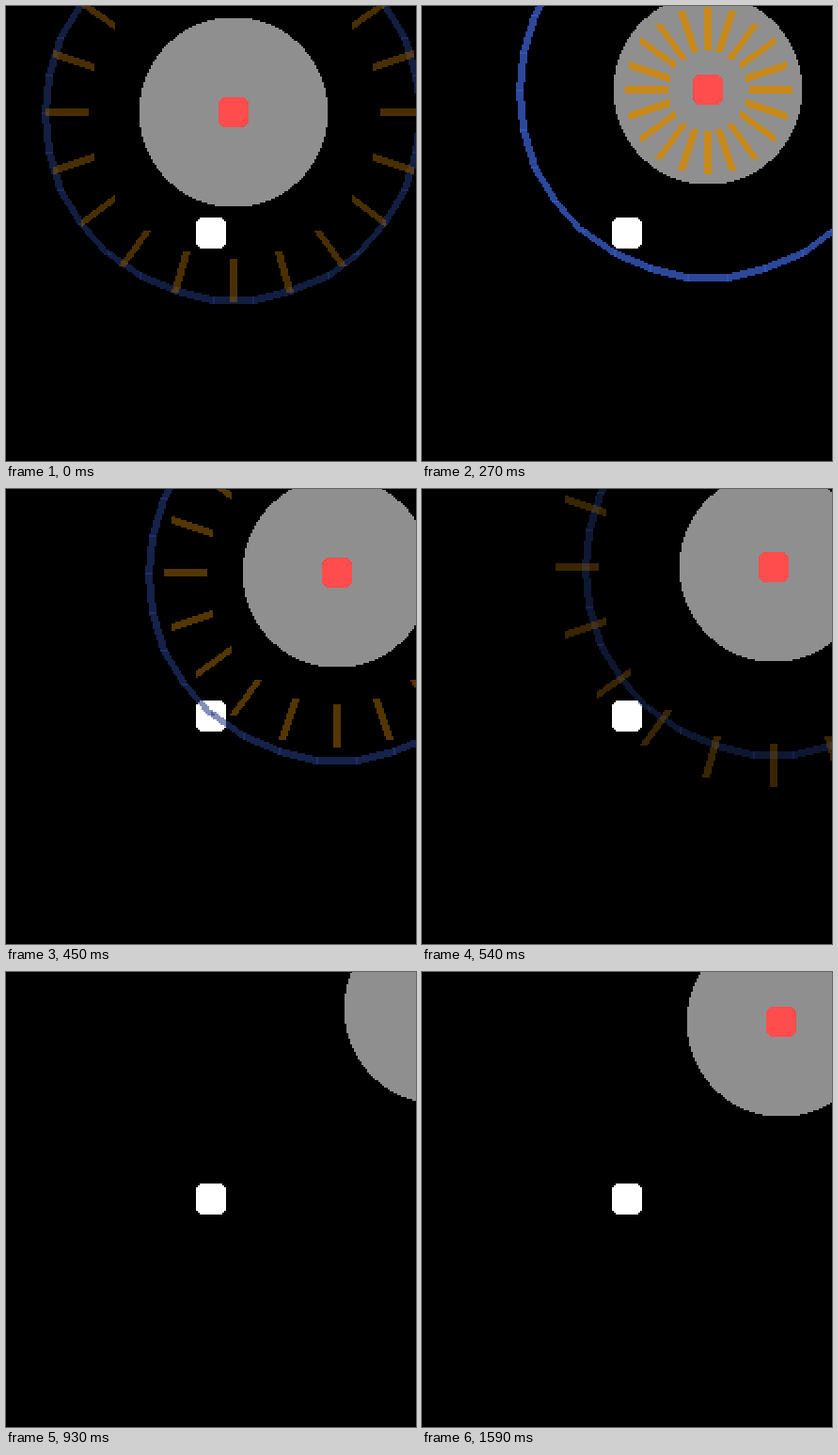
An HTML page with a canvas that plays this animation: 436 px wide and 484 px high, repeating every 1.8 s.

```html
<!DOCTYPE html>
<html lang="en">
<head>
<meta charset="utf-8">
<title>Pulse</title>
<style>
html, body { margin: 0; width: 100%; height: 100%; overflow: hidden; background: #000; }
canvas { display: block; }
</style>
</head>
<body>
<canvas id="stage" width="436" height="484"></canvas>
<script>
const ctx = document.getElementById('stage').getContext('2d');
const LOOP = 1800, TICK = 30, CELL = 2;
const RANGE = 200, SIDES = 30, RAYS = 20, THICK = 8;
const PULSE_STARTS = [-10, 6], PULSE_LIFE = 14;

// Waypoints of the red block: tick, x, y
const PATH = [
  [0, 242, 113], [4, 264.6, 89], [17, 368.6, 89], [23, 402.6, 53],
  [25, 414, 39], [31, 460, 39], [43, 460, 39], [44, 452, 39],
  [48, 420, 39], [50, 406, 53], [53, 382, 53], [60, 382, 53]
];

// The pixel grid starts at even x and odd y
const snapX = x => Math.floor(x / CELL + 1e-6) * CELL;
const snapY = y => Math.floor((y - 1) / CELL + 1e-6) * CELL + 1;

function positionAt(tick) {
  const i = PATH.findIndex(p => p[0] > tick);
  const [t0, x0, y0] = PATH[i - 1];
  const [t1, x1, y1] = PATH[i];
  const k = (tick - t0) / (t1 - t0);
  return {
    x: snapX(x0 + (x1 - x0) * k + 1),
    y: snapY(y0 + (y1 - y0) * k + 1)
  };
}

function disc(cx, cy, r, color) {
  ctx.fillStyle = color;
  for (let y = -r; y < r; y += CELL) {
    const dy = y < 0 ? y + CELL : y;
    const half = Math.round(Math.sqrt(r * r - dy * dy) / CELL) * CELL;
    ctx.fillRect(cx - half, cy + y, half * 2, CELL);
  }
}

// Square with stepped corners
function block(x, y, w, h, color) {
  ctx.fillStyle = color;
  for (const inset of [0, CELL, 2 * CELL]) {
    const cut = 2 * CELL - inset;
    ctx.fillRect(x + inset, y + cut, w - 2 * inset, h - 2 * cut);
  }
}

// Stepped line, its thickness measured across the longer axis
function line(x0, y0, x1, y1) {
  x0 = snapX(x0); x1 = snapX(x1);
  y0 = snapY(y0); y1 = snapY(y1);
  const dx = x1 - x0, dy = y1 - y0;
  const flat = Math.abs(dx) >= Math.abs(dy);
  const steps = Math.max(Math.abs(dx), Math.abs(dy)) / CELL;
  ctx.beginPath();
  for (let i = 0; i <= steps; i++) {
    const k = steps ? i / steps : 0;
    const x = snapX(x0 + dx * k + CELL / 2), y = snapY(y0 + dy * k + CELL / 2);
    if (flat) ctx.rect(x, y - THICK / 2, CELL, THICK);
    else ctx.rect(x - THICK / 2, y, THICK, CELL);
  }
  ctx.fill();
}

// The colour darkens while it also turns transparent
function faded(r, g, b, a) {
  return `rgba(${Math.round(r * a)}, ${Math.round(g * a)}, ${Math.round(b * a)}, ${a})`;
}

function ring(x, y, a) {
  ctx.fillStyle = faded(65, 105, 225, a);
  const px = i => x + RANGE * Math.cos(i * 2 * Math.PI / SIDES);
  const py = i => y + RANGE * Math.sin(i * 2 * Math.PI / SIDES);
  for (let i = 0; i < SIDES; i++) line(px(i), py(i), px(i + 1), py(i + 1));
}

function rays(x, y, age, a) {
  ctx.fillStyle = faded(255, 165, 0, a);
  if (age === 0) {
    ctx.fillRect(x - 4, snapY(y) - 4, 4, THICK);
    return;
  }
  const inner = 16 * age - 4, outer = 16 * age + 40;
  for (let i = 0; i < RAYS; i++) {
    const c = Math.cos(i * 2 * Math.PI / RAYS), s = Math.sin(i * 2 * Math.PI / RAYS);
    line(x + inner * c, y + inner * s, x + outer * c, y + outer * s);
  }
}

function draw(time) {
  const tick = Math.floor((time % LOOP) / TICK);
  const { x, y } = positionAt(tick);
  ctx.fillStyle = '#000';
  ctx.fillRect(0, 0, 436, 484);
  disc(x, y, 100, '#8f8f8f');
  block(202, 225, 32, 33, '#fff');
  block(x - 16, y - 16, 32, 32, '#ff4d4d');
  for (const start of PULSE_STARTS) {
    const age = tick - start;
    if (age < 0 || age >= PULSE_LIFE) continue;
    const a = Math.pow(0.94, age);
    ring(x, y + 1.6, a);
    rays(x, y + 1.6, age, a);
  }
}

function loop() {
  draw(performance.now());
  requestAnimationFrame(loop);
}
loop();
</script>
</body>
</html>
```
